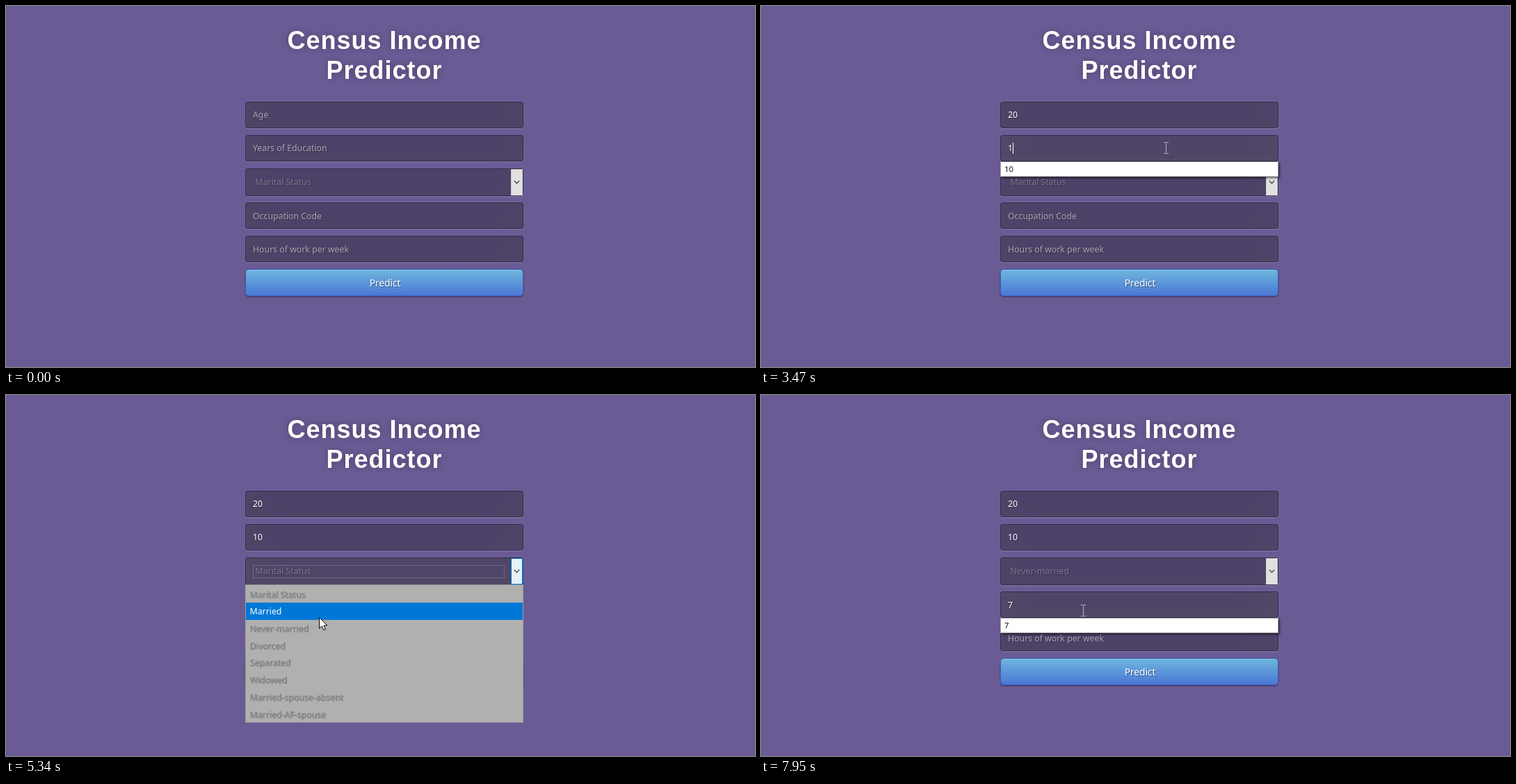
These frames come from a looping animation (1077x520 px, 8000 ms). An HTML page with a canvas:

```html
<!DOCTYPE html>
<html lang="en">
<head>
<meta charset="utf-8">
<title>Census Income Predictor</title>
<style>
html, body { margin: 0; width: 1077px; height: 520px; overflow: hidden; background: #6b5b95; }
body { position: relative; font: 12.3px/16px "Noto Sans", "Open Sans", sans-serif; color: #fff; }
body *, canvas { position: absolute; box-sizing: border-box; white-space: pre; }
h1 {
  left: 344px; top: 28px; width: 400px; margin: 0; text-align: center;
  font: bold 36px/43px "Liberation Sans", Arial, sans-serif;
  letter-spacing: 1px; text-shadow: 0 0 10px rgba(0,0,0,.3);
}
.field {
  left: 344px; width: 400px; height: 38px; border-radius: 4px;
  background: rgba(0,0,0,.3); border: 1px solid rgba(0,0,0,.3);
  text-shadow: 1px 1px 1px rgba(0,0,0,.3);
}
.label { left: 10px; top: 10px; }
.empty { color: rgba(255,255,255,.54); }
.caret { left: 10px; top: 10px; width: 1px; height: 16px; background: #fff; }
.select { height: 40px; }
.select .label { left: 13.5px; top: 11px; color: rgba(255,255,255,.3); }
.ring { left: 10px; top: 10px; width: 362px; height: 19px; border: 1px dotted #8d8698; }
.arrow { left: 381px; top: 0; width: 17px; height: 38px; background: #e1e1e1; border: 1px solid #cfcfcf; }
.arrow svg { left: 3px; top: 15px; }
.focus .arrow { background: #e5f1fb; border-color: #0078d7; box-shadow: 1px 0 0 #14539a; }
.button {
  left: 344px; top: 379px; width: 400px; height: 39px; border-radius: 5px;
  border: 1px solid #3762bc; background: linear-gradient(#6eb6de, #4a77d4);
  box-shadow: inset 0 1px 0 rgba(255,255,255,.2), 0 1px 2px rgba(0,0,0,.5);
  font-size: 14px; line-height: 38px; letter-spacing: -.2px; text-align: center;
  text-shadow: 1px 1px 1px rgba(0,0,0,.4); padding-left: 2px;
}
.tip, .hint { background: #fff; color: #111; font-size: 11.3px; border: 1px solid #a6a6a6; }
.tip { left: 629px; top: 178px; width: 134px; height: 21px; line-height: 20px; padding-left: 5px;
  font-weight: 500; border-color: #767676; }
.hint { left: 344px; width: 400px; height: 22px; line-height: 20px; padding-left: 5px;
  box-shadow: 2px 2px 3px rgba(0,0,0,.55); }
.list { left: 344px; top: 273px; width: 400px; height: 199px; background: #b0b0ae; border: 1px solid #9b9b9b; }
.option { left: 0; width: 398px; height: 24.7px; line-height: 25px; padding-left: 5.5px;
  color: #828282; text-shadow: 1px 1px 1px rgba(0,0,0,.25); }
.option.on { background: #0078d7; color: #fff; text-shadow: none; }
canvas { left: 0; top: 0; }
</style>
</head>
<body>
<script>
const LOOP = 8000, ROW = 24.7, LIST_TOP = 274.6;
const STATUSES = ['Marital Status', 'Married', 'Never-married', 'Divorced', 'Separated',
  'Widowed', 'Married-spouse-absent', 'Married-AF-spouse'];

// keys: [time, typed text]; carets: [from, to]; hint: [from, to, text]
const FIELDS = [
  { top: 138, name: 'Age', focus: [990, 2840], keys: [[1690, '2'], [1930, '20']],
    carets: [[990, 1540], [1690, 2070]], hint: [1780, 2840, '20'] },
  { top: 186, name: 'Years of Education', focus: [2840, 4630], keys: [[3310, '1'], [3620, '10']],
    carets: [[2840, 3170], [3310, 3770], [4170, 4630]], hint: [3390, 3620, '10'] },
  { top: 234, name: STATUSES[0], focus: [4630, 6490], keys: [[5720, STATUSES[2]]],
    carets: [], select: true },
  { top: 283, name: 'Occupation Code', focus: [6490, LOOP + 1000], keys: [[7650, '7']],
    carets: [[6490, 6840], [7340, 7950]], hint: [7720, LOOP, '7'] },
  { top: 331, name: 'Hours of work per week', focus: [LOOP, LOOP + 1000], keys: [], carets: [] }
];
FIELDS[1].hint[1] = 4170;

const LIST_OPEN = [4630, 5720], TIP = [1540, 2450];
const CLICKS = [[990, 1230], [2840, 3080], [4630, 4790], [5570, 5720], [6490, 6730]];

// pointer moves: start, end, steps, x, y
const START = [1037, 561];
const MOVES = [
  [520, 830, 5, 632, 161], [990, 990, 1, 629, 157], [2300, 2300, 1, 631, 163],
  [2370, 2760, 6, 582, 204], [4170, 4480, 5, 520, 254], [4860, 5340, 7, 450, 320],
  [5430, 5430, 1, 447, 329], [5490, 5490, 1, 445, 338], [5960, 6350, 6, 463, 310]
];

const within = (t, [a, b]) => t >= a && t < b;
const clamp = v => Math.max(0, Math.min(1, v));
const smooth = v => { v = clamp(v); return v * v * (3 - 2 * v); };
const show = (el, on) => { el.style.visibility = on ? 'visible' : 'hidden'; };

function add(parent, cls, text = '', tag = 'div') {
  const el = document.createElement(tag);
  el.className = cls;
  el.textContent = text;
  parent.appendChild(el);
  return el;
}

const page = document.body;
add(page, '', 'Census Income\nPredictor', 'h1');

for (const f of FIELDS) {
  f.box = add(page, f.select ? 'field select' : 'field');
  f.box.style.top = f.top + 'px';
  f.label = add(f.box, 'label', f.name);
  if (f.top > 280) f.label.style.top = '11px';
  if (f.select) {
    f.ring = add(f.box, 'ring');
    add(f.box, 'arrow').innerHTML =
      '<svg width="9" height="6"><path d="M.8 .8L4.5 4.5L8.2 .8" fill="none" stroke="#444" stroke-width="1.3"/></svg>';
  } else {
    f.caret = add(f.box, 'caret');
  }
}
add(page, 'button', 'Predict');
const tip = add(page, 'tip', 'Please fill out this field.');
for (const f of FIELDS) {
  if (!f.hint) continue;
  f.popup = add(page, 'hint', f.hint[2]);
  f.popup.style.top = f.top + 38 + 'px';
}
const list = add(page, 'list');
const options = STATUSES.map((s, i) => {
  const el = add(list, 'option', s);
  el.style.top = LIST_TOP - 274 + i * ROW + 'px';
  return el;
});

const canvas = add(page, '', '', 'canvas');
canvas.width = 1077;
canvas.height = 520;
const ctx = canvas.getContext('2d');

function pointer(t) {
  let [x, y] = START;
  for (const [a, b, n, tx, ty] of MOVES) {
    if (t < a) break;
    const k = n > 1 ? clamp((Math.floor((t - a) / (b - a) * (n - 1) + 1e-6) + 1) / n) : 1;
    x += (tx - x) * k;
    y += (ty - y) * k;
  }
  return [Math.round(x), Math.round(y)];
}

function overText(t, x, y) {
  if (within(t, LIST_OPEN) || x < 344 || x > 744) return false;
  const covered = FIELDS.some(f => f.hint && within(t, f.hint) && y >= f.top + 38 && y < f.top + 60);
  return !covered && FIELDS.some(f => !f.select && y >= f.top && y < f.top + 38);
}

function drawBeam(x, y) {
  ctx.fillStyle = '#b9b4c4';
  ctx.fillRect(x, y - 7, 1, 15);
  for (const dy of [-8, 8]) {
    ctx.fillRect(x - 3, y + dy, 3, 1);
    ctx.fillRect(x + 1, y + dy, 3, 1);
  }
}

function drawArrow(x, y) {
  ctx.save();
  ctx.translate(x + .5, y + .5);
  ctx.beginPath();
  ctx.moveTo(0, 0);
  ctx.lineTo(0, 16);
  ctx.lineTo(3.8, 12.5);
  ctx.lineTo(6.3, 18);
  ctx.lineTo(8.8, 17);
  ctx.lineTo(6.4, 11.5);
  ctx.lineTo(11.3, 11.3);
  ctx.closePath();
  ctx.fillStyle = '#fff';
  ctx.fill();
  ctx.strokeStyle = '#000';
  ctx.lineWidth = 1;
  ctx.stroke();
  ctx.restore();
}

function drawPointer(t) {
  ctx.clearRect(0, 0, 1077, 520);
  if (t < MOVES[0][0]) return;
  const [x, y] = pointer(t);
  if (CLICKS.some(c => within(t, c))) {
    ctx.fillStyle = 'rgba(187,178,37,.78)';
    ctx.beginPath();
    ctx.arc(x, y, 12, 0, Math.PI * 2);
    ctx.fill();
  }
  (overText(t, x, y) ? drawBeam : drawArrow)(x, y);
}

function drawField(f, t) {
  const typed = f.keys.filter(k => t >= k[0]).pop();
  const text = typed ? typed[1] : f.name;
  if (f.label.textContent !== text) f.label.textContent = text;
  f.label.classList.toggle('empty', !typed && !f.select);

  const [on, off] = f.focus;
  const glow = .2 + .2 * (smooth((t - on) / 500) - smooth((t - off) / 500));
  f.box.style.boxShadow =
    `inset 0 -5px 45px rgba(100,100,100,${glow}), 0 1px 1px rgba(255,255,255,.2)`;

  if (f.select) {
    const focused = within(t, f.focus);
    f.box.classList.toggle('focus', focused);
    show(f.ring, focused);
  } else {
    f.caret.style.left = 10 + (typed ? text.length * 7 : 0) + 'px';
    show(f.caret, f.carets.some(c => within(t, c)));
  }
  if (f.popup) show(f.popup, within(t, f.hint));
}

function draw(t) {
  FIELDS.forEach(f => drawField(f, t));
  show(tip, within(t, TIP));
  show(list, within(t, LIST_OPEN));
  const row = Math.max(0, Math.floor((pointer(t)[1] - LIST_TOP) / ROW));
  options.forEach((el, i) => el.classList.toggle('on', i === row));
  drawPointer(t);
}

const begin = performance.now();
function tick() {
  draw((performance.now() - begin) % LOOP);
  requestAnimationFrame(tick);
}
tick();
</script>
</body>
</html>
```
